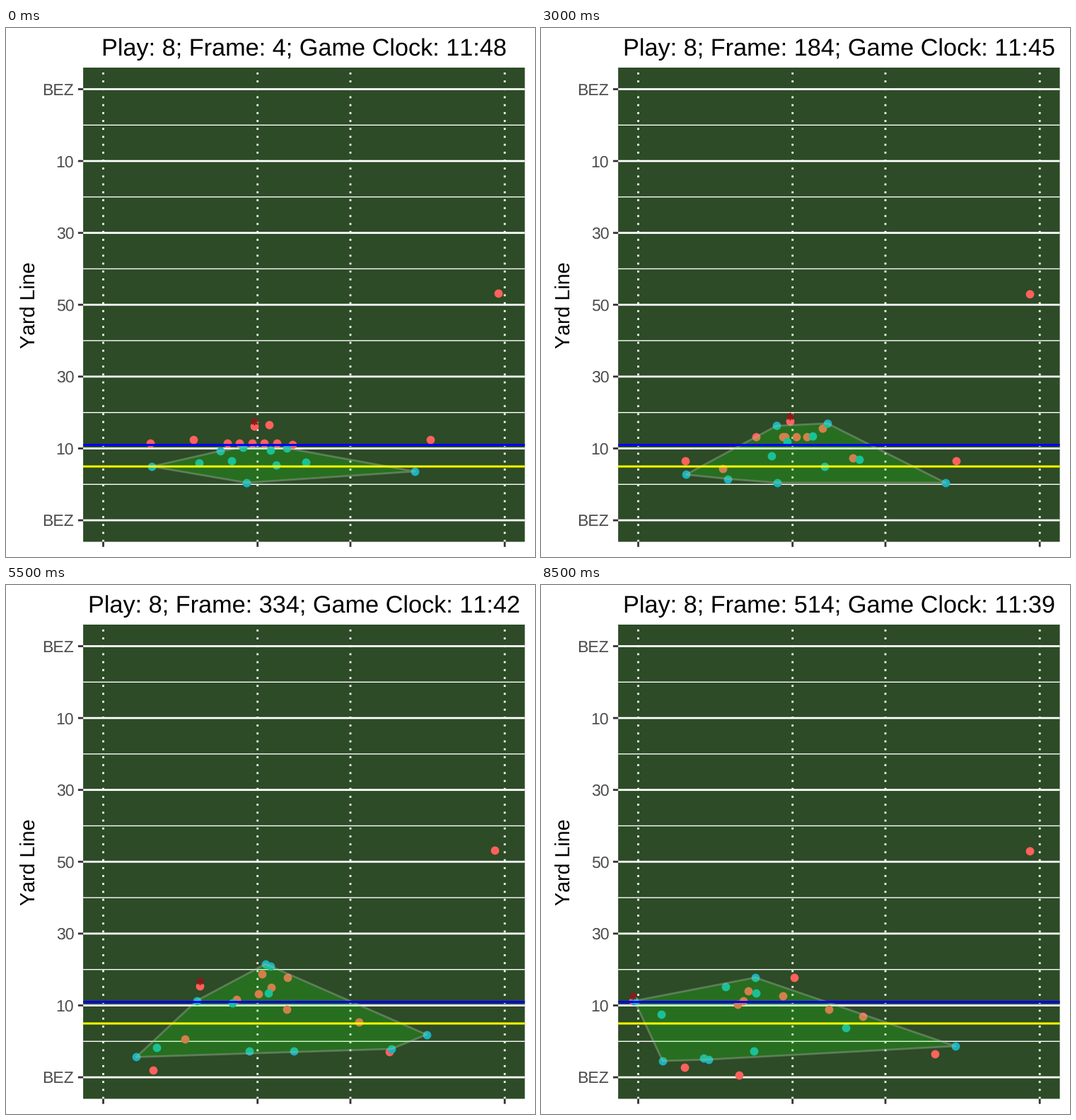
These frames come from a looping animation (748x748 px, 9000 ms). A matplotlib script:

```python
import numpy as np
import matplotlib.pyplot as plt
from matplotlib.animation import FuncAnimation
from matplotlib.patches import Polygon, Rectangle

plt.rcParams.update({
    "font.family": "Liberation Sans",
    "text.kerning_factor": 6,
    "text.hinting": "none",
    "path.snap": False,
})

SIZE, DPI = 748, 100
STEPS, STEP_MS = 18, 500
PT = 72 / DPI  # points per pixel

LEFT, RIGHT, TOP, BOTTOM = 109.1, 733.6, 56, 726.5
TURF, RED, TEAL = "#2c4b26", "#ff615c", "#1bb2bd"
SNAP = 3  # step at which the play starts

step = np.arange(STEPS)


def ease(a, b):
    """Smooth rise from 0 at step a to 1 at step b."""
    u = np.clip((step - a) / (b - a), 0, 1)
    return u * u * (3 - 2 * u)


def go(start, *legs):
    """One coordinate: a start value plus eased (shift, from, to) legs."""
    return start + sum(d * ease(a, b) for d, a, b in legs)


def player(x, y):
    return np.column_stack([x, y])


def lineman(k, x_legs, *y_legs):
    """Blocker in the evenly spaced row; all step back at the snap."""
    return player(go(313 + 17.5 * k, *x_legs), go(587, (-9, SNAP, 6), *y_legs))


# Passer drops back a little, then rolls out to the left.
qb = player(go(351, (4, 0, 3), (-3, 3, 6), (-222, 7, 17)),
            go(563, (-7, SNAP, 6), (32, 7, 17)))

# The spy starts below the passer and closes in on him.
spy = qb + player(go(-32, (34, SNAP, 14)), go(49, (-49, 6, 15)))

sideline = player(691 + 5 * np.exp(-step / 2.2), 375.5 + 0.5 * np.sin(step / 2 - 1))

line_up = [
    lineman(0, [(-9, 3, 6), (62, 6, 9), (-73, 10, 17)], (-37, 6, 9), (33, 9, 15)),
    lineman(1, [(12, 3, 6), (-64, 8, 17)], (15, 8, 14)),
    lineman(2, [(-6, 3, 6), (65, 5, 13)], (22, 6, 10)),
    lineman(3, [(-4, 3, 6), (-75, 10, 17)], (-4, 6, 9), (14, 9, 15)),
    lineman(4, [(-7, 3, 6), (14, 6, 9), (-48, 8, 16)], (-9, 6, 9), (12, 11, 17)),
]

runners = [
    player(go(372, (26, 3, 6), (-40, 12, 17)), go(561, (5, 3, 6), (-11, 6, 9))),
    # wide left, slot, tight end, wide right
    player(go(204, (76, 10, 17)), go(587, (106, 3, 12.5))),
    player(go(265, (-48, 5, 9), (48, 9, 12), (-62, 13, 17)), go(582, (41, 3, 6), (59, 8, 16))),
    player(go(405, (4, 0, 3), (148, 3, 13)), go(589, (74, 3, 12))),
    player(go(600, (-145, 4, 15)), go(582, (36, 3, 7), (-8, 13, 17))),
]

rushers = [
    player(go(303, (4, 0, 3), (66, 3, 10), (-112, 10, 17)),
           go(598, (-7, 0, 3), (-44, 3, 8), (-11, 9, 11), (32, 11, 17))),
    player(go(335, (13, 3, 6), (-178, 9, 17)), go(593, (-8, 3, 6), (22, 8, 17))),
    player(go(374, (-7, 0, 3), (27, 3, 8), (-90, 8, 17)), go(597, (-6, 0, 3), (-14, 3, 6))),
    player(go(397, (8, 0, 3), (-45, 6, 14), (-57, 13, 17)),
           go(594, (-35, 3, 6), (-20, 6, 11), (16, 11, 17))),
]

cover = [
    player(go(206, (-34, 5, 15)), go(620, (53, 3, 13))),
    player(go(273, (-60, 5, 9), (44, 11, 13), (-27, 13, 17)),
           go(615, (45, 3, 9), (-12, 9, 13), (21, 13, 17))),
    player(go(340, (-6, 3, 6), (16, 6, 9), (-113, 10, 17)), go(643, (16, 6, 10), (12, 13, 17))),
    player(go(382, (-7, 0, 3), (52, 3, 9), (-126, 9, 17)), go(618, (48, 5, 13), (-7, 13, 17))),
    player(go(424, (7, 0, 3), (29, 3, 8), (85, 9, 11), (-114, 11, 15)),
           go(614, (-4, 0, 3), (46, 8, 11), (-30, 11, 15))),
    player(go(578, (-6, 3, 6), (32, 6, 9), (-36, 10, 13), (18, 13, 17)),
           go(627, (16, 3, 6), (-13, 6, 10), (22, 10, 13))),
]

offence = np.stack(line_up + runners + [qb, sideline], axis=1)
defence = np.stack(rushers + cover + [spy], axis=1)


def half_hull(pts):
    out = []
    for x, y in pts:
        while len(out) > 1:
            (ax, ay), (bx, by) = out[-2:]
            if (bx - ax) * (y - ay) - (by - ay) * (x - ax) > 0:
                break
            out.pop()
        out.append((x, y))
    return out[:-1]


def hull(pts):
    pts = sorted(map(tuple, pts))
    return half_hull(pts) + half_hull(pts[::-1])


fig = plt.figure(figsize=(SIZE / DPI, SIZE / DPI), dpi=DPI, facecolor="white")
ax = fig.add_axes([0, 0, 1, 1])
ax.set_xlim(0, SIZE)
ax.set_ylim(SIZE, 0)
ax.axis("off")


def line(xs, ys, color="white", width=2.8, z=1, **kw):
    ax.plot(xs, ys, color=color, lw=width * PT, zorder=z, snap=False,
            solid_capstyle="butt", dash_capstyle="butt", **kw)


def dots(color, z, **kw):
    return ax.plot([], [], ls="", color=color, zorder=z, snap=False, **kw)[0]


ax.add_patch(Rectangle((LEFT, TOP), RIGHT - LEFT, BOTTOM - TOP,
                       color=TURF, lw=0, zorder=0, snap=False))

GAP = 101.6
for n, label in enumerate(["BEZ", "10", "30", "50", "30", "10", "BEZ"]):
    y = 86.5 + n * GAP
    line([LEFT, RIGHT], [y, y])
    line([LEFT - 7.2, LEFT], [y, y], "#333333")
    ax.text(96.3, y + 8.2, label, size=23 * PT, color="#4d4d4d", ha="right", va="baseline")
    if n < 6:
        line([LEFT, RIGHT], [y + GAP / 2] * 2, width=1.4)

for x in (137.5, 355.7, 487, 705.2):
    line([x, x], [BOTTOM, TOP], ls=(0, (1, 3)))
    line([x, x], [BOTTOM, BOTTOM + 7.2], "#333333")

ax.text(40.7, 391.3, "Yard Line", size=28.6 * PT, rotation=90, rotation_mode="anchor",
        ha="center", va="baseline")
title = ax.text(421.1, 39.3, "", size=34.3 * PT, ha="center", va="baseline")

round_dot = dict(marker="o", ms=11.8 * PT, mew=0)
reds = dots(RED, 2, **round_dot)
teals = dots(TEAL, 3, **round_dot)
ball = dots("#8b1a1a", 4, marker=(8, 2, 0), ms=10.5 * PT, mew=1.7 * PT)
zone = Polygon([(0, 0), (1, 0), (0, 1)], closed=True, fc=(0.1, 1, 0.03, 0.2),
               ec=(0.72, 0.72, 0.72, 0.36), lw=2.8 * PT, joinstyle="round", zorder=5)
ax.add_patch(zone)

line([LEFT, RIGHT], [589.6] * 2, "blue", 3, z=6)
line([LEFT, RIGHT], [620] * 2, "yellow", 3, z=6)


def draw(i):
    reds.set_data(*offence[i].T)
    teals.set_data(*defence[i].T)
    ball.set_data([qb[i, 0]], [qb[i, 1] - 7])
    zone.set_xy(hull(defence[i]))
    title.set_text(f"Play: 8; Frame: {4 + 30 * i}; Game Clock: 11:{48 - (i + 1) // 2}")
    return reds, teals, ball, zone, title


anim = FuncAnimation(fig, draw, frames=STEPS, interval=STEP_MS, repeat=True, repeat_delay=0)
plt.show()
```
